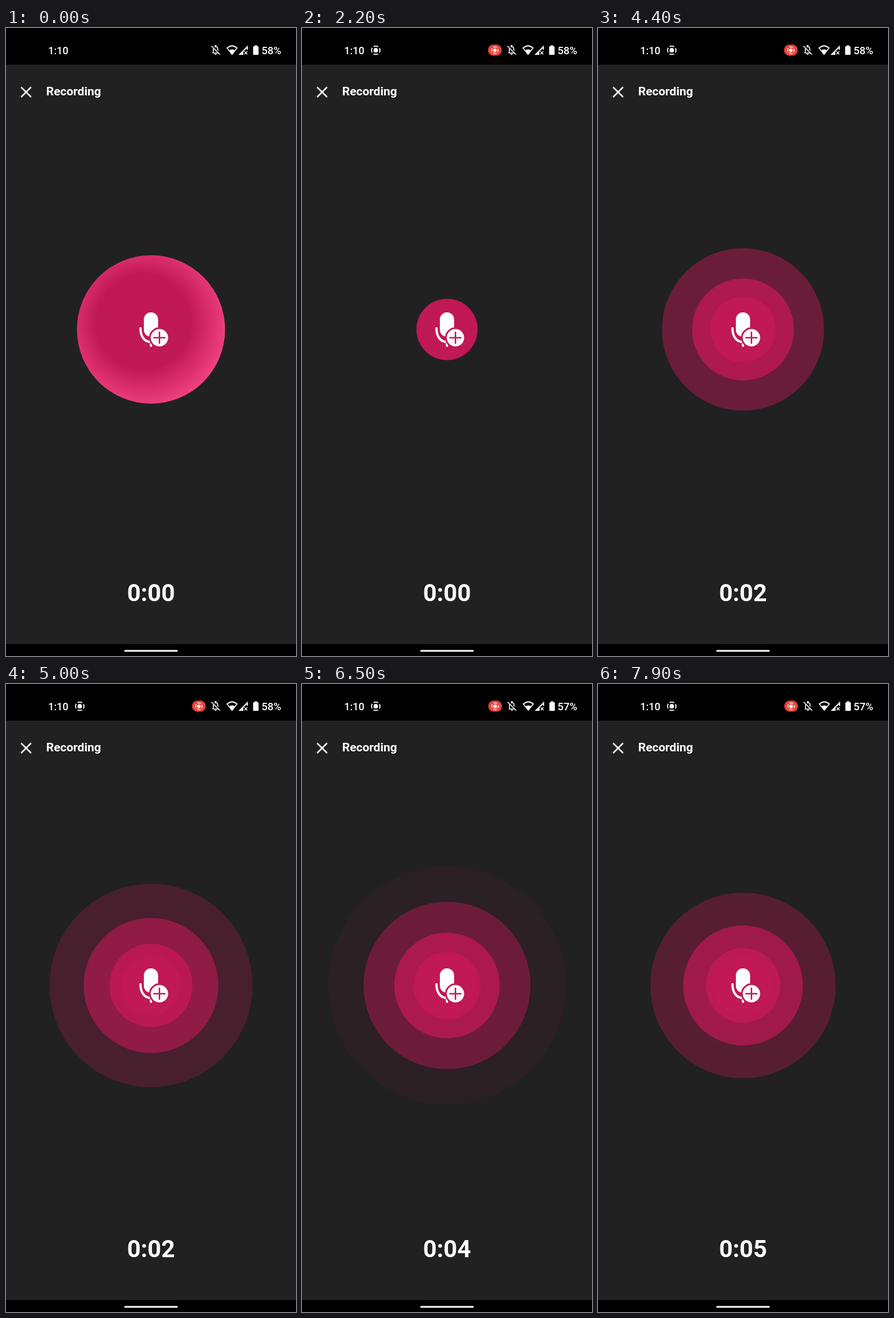
Write an HTML page that moves like this. It is 509 by 1100 pixels and loops after 8 s.

```html
<!DOCTYPE html>
<html lang="en">
<head>
<meta charset="utf-8">
<title>Recording</title>
<style>
  html, body { margin: 0; width: 100%; height: 100%; overflow: hidden; background: #212121; }
  svg { display: block; width: 100vw; height: 100vh; }
  text { fill: #fff; font-family: Roboto, sans-serif; font-weight: 700; }
  .status { font-size: 18px; font-weight: 500; }
  .line { fill: none; stroke: #fff; }
</style>
</head>
<body>
<svg viewBox="0 0 509 1100">
  <defs>
    <radialGradient id="press" gradientUnits="userSpaceOnUse" cx="241" cy="515" r="148">
      <stop offset=".56" stop-color="#c11955"/>
      <stop offset="1" stop-color="#f04180"/>
    </radialGradient>
    <g id="cast">
      <circle r="4" fill="#fff"/>
      <circle class="line" r="7.4" stroke-width="1.9" stroke-dasharray="8.4 3.224" stroke-dashoffset="4.2"/>
    </g>
  </defs>
  <rect width="509" height="1100" fill="#212121"/>
  <path d="M0 0H509V64H0zM0 1079H509V1100H0z"/>
  <rect x="207.5" y="1089.5" width="94" height="3" rx="1.5" fill="#fff"/>

  <text class="status" x="74" y="46">1:10</text>
  <g id="sharing">
    <use href="#cast" x="129.5" y="39"/>
    <g id="chip">
      <rect x="326.5" y="29" width="24" height="19.5" rx="9.5" fill="#e8413a"/>
      <use href="#cast" transform="translate(338.5 39) scale(.78)"/>
    </g>
  </g>
  <g id="icons" fill="#fff">
    <path class="line" stroke-width="1.6" d="M360.5 31.5L375.5 46.5M362.5 43.8H373M363.8 43.5V37.2Q363.8 35.8 364.6 34.6M366 33.2Q367.5 32.3 369.2 32.8Q371.8 33.8 371.8 37.2V39.5"/>
    <path d="M366.3 32.5V31.2a1.5 1.5 0 0 1 3 0V32.5zM366 45.2h3.8a1.9 1.9 0 0 1 -3.8 0z"/>
    <path class="line" stroke-width="1.7" stroke-linejoin="round" d="M388 35Q397 27.500 405.500 35L396.700 46z"/>
    <path d="M391.500 39.500Q396.700 35.500 402 39.500L396.700 46.500z"/>
    <path d="M408 47L424.500 30.500V38H422.500V35.500L416.500 41.500V47z"/>
    <path class="line" stroke-width="1.5" d="M418.500 41l5 5M423.500 41l-5 5"/>
    <rect x="433.700" y="32" width="9.600" height="15" rx="1.500"/>
    <rect x="436.300" y="30.300" width="4.400" height="3"/>
    <rect id="empty" x="435.200" y="33.600" width="6.600" height="5"/>
  </g>
  <text class="status" id="battery" x="448.500" y="46" style="font-size:18.500px"></text>

  <path class="line" stroke-width="2.600" d="M26.500 103.500L44 121M44 103.500L26.500 121"/>
  <text x="70.500" y="118" font-size="21">Recording</text>

  <g id="rings" fill="#c11955"></g>
  <circle id="button" cx="254.500" cy="528" fill="url(#press)"/>
  <rect x="242" y="498" width="25" height="43" rx="12.500" fill="#fff"/>
  <path class="line" stroke-width="4" stroke-linecap="round" d="M236 526C236 540 243 550 254.500 550V556.500"/>
  <circle cx="269.300" cy="542.500" r="16.700" fill="#fff" stroke="#c11955" stroke-width="3"/>
  <path d="M258.500 542.500H280M269.300 532V553" stroke="#c11955" stroke-width="2.600"/>
  <text id="timer" x="254.500" y="1004" font-size="42" text-anchor="middle"></text>
</svg>
<script>
const LOOP = 8000, BASE = 52;
const $ = id => document.getElementById(id);
const clamp = x => Math.min(1, Math.max(0, x));
const span = (t, from, to) => clamp((t - from) / (to - from));
const ease = x => (1 - Math.cos(Math.PI * x)) / 2;

// [time in ms, ripples started so far]
const pace = [[1860, 0], [2700, .84], [3700, 1.93], [5000, 3.19], [5900, 4.08], [7200, 5.38], [7900, 5.94], [8000, 6.03]];
function beatAt(t) {
  if (t < pace[0][0]) return 0;
  const i = pace.findIndex(p => p[0] > t);
  const [t0, b0] = pace[i - 1], [t1, b1] = pace[i];
  return b0 + (b1 - b0) * span(t, t0, t1);
}

const rings = Array.from({ length: 7 }, () => {
  const ring = document.createElementNS('http://www.w3.org/2000/svg', 'circle');
  ring.setAttribute('cx', 254.5);
  ring.setAttribute('cy', 528);
  return $('rings').appendChild(ring);
});

function draw(t) {
  const beat = beatAt(t);
  rings.forEach((ring, n) => {
    const age = Math.max(0, beat - n);
    const growth = 260 * Math.sin(Math.min(age * .2415, Math.PI / 2)) ** 2;
    ring.setAttribute('r', BASE + growth);
    ring.setAttribute('opacity', age > 0 ? clamp(1 - growth / 167) : 0);
  });

  $('press').setAttribute('r', 148 + 320 * span(t, 0, 500));
  $('button').setAttribute('r', 130 - (130 - BASE) * ease(span(t, 1300, 1750)));
  $('sharing').setAttribute('opacity', span(t, 350, 600));

  const low = t >= 5650;
  const shift = `translate(${low ? .5 : 0} 0)`;
  $('chip').setAttribute('transform', shift);
  $('icons').setAttribute('transform', shift);
  $('empty').setAttribute('height', low ? 5.6 : 5);
  $('battery').textContent = low ? '57%' : '58%';
  $('timer').textContent = '0:0' + Math.max(0, Math.floor((t - 2390) / 1000));
}

function tick() {
  draw(performance.now() % LOOP);
  requestAnimationFrame(tick);
}
tick();
</script>
</body>
</html>
```
